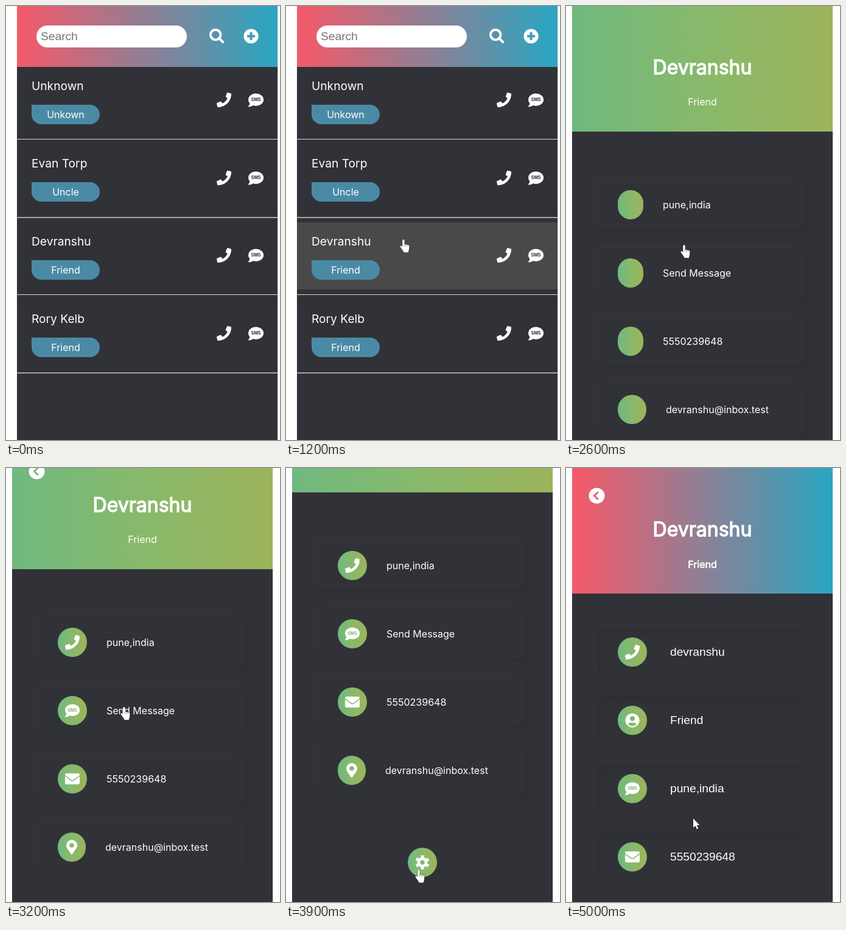
An HTML page for the animation above (5.1 s loop, 450 px wide and 712 px high).

```html
<!DOCTYPE html>
<html lang="en">
<head>
<meta charset="utf-8">
<title>Contacts</title>
<style>
  :root { --dark: #313237; --warm: linear-gradient(90deg, #f05b6b 3%, #2ea4bf 97%); --fresh: linear-gradient(90deg, #6fb97f, #88b96b 50%, #9db45c); }
  * { box-sizing: border-box; }
  html, body { margin: 0; width: 100%; height: 100%; overflow: hidden; background: #fff; }
  body { position: relative; color: #fff; font: 16px/24px Inter, sans-serif; }
  body * { animation-duration: 5100ms; animation-timing-function: step-end; animation-iteration-count: infinite; }
  svg { display: block; fill: currentColor; fill-rule: evenodd; overflow: visible; }

  .stage { position: absolute; inset: 0 auto auto 0; width: 450px; height: 712px; overflow: hidden; }
  .scene { position: absolute; top: 0; width: 428px; height: 712px; overflow: hidden; background: var(--dark); --cut: var(--dark); }
  .scene > *, .row > *, .page > * { position: absolute; }
  #list { left: 18px; animation-name: list; }
  #detail { left: 10px; animation-name: detail; }
  #edit { left: 10px; animation-name: edit; }
  .head { inset: 0 0 auto 0; background: var(--warm); }

  /* contact list */
  #list .head { height: 100px; }
  .search { left: 32px; top: 32px; width: 247px; height: 36px; padding-left: 7px; border-radius: 18px; background: #fff; color: #757575; font: 19.2px/35px "Liberation Sans", Arial, sans-serif; }
  .row { left: 0; width: 428px; height: 110px; }
  .glow { inset: 0; background: #494949; opacity: 0; }
  .row:nth-of-type(3) .glow { animation-name: glow1; }
  .row:nth-of-type(4) .glow { animation-name: glow2; }
  .row:nth-of-type(5) .glow { animation-name: glow3; }
  .who { left: 24px; top: 19px; font-size: 19.2px; white-space: nowrap; }
  .tag { left: 24px; top: 62px; width: 112px; height: 32px; border-radius: 0 16px 16px 16px; background: #4a8aa5; line-height: 32px; text-align: center; }
  .rule { left: 0; top: 118.5px; width: 428px; height: 1px; background: #dadada; }
  .row:nth-of-type(even) .rule { height: 2px; background: #a4a4a7; }

  /* contact pages */
  .page { position: absolute; inset: 0; }
  #detail .page { animation-name: scroll; }
  .page .head { height: 206px; }
  #detail .head { background: var(--fresh); }
  .title, .sub { left: 0; width: 100%; text-align: center; }
  .title { top: 81px; font-size: 32px; line-height: 40px; -webkit-text-stroke: 1.3px #fff; }
  .sub { top: 145px; }
  #edit .sub { top: 146px; -webkit-text-stroke: .7px #fff; }
  .back { left: 27px; top: 32px; animation-name: icons; }
  .card { left: 43px; width: 339px; height: 80px; padding-left: 32px; display: flex; align-items: center; gap: 32px; border-radius: 10px; white-space: nowrap; box-shadow: -7px -7px 8px #353437, 7px 7px 10px #2f3035; }
  #edit .card { gap: 38px; font: 19.2px/24px "Liberation Sans", Arial, sans-serif; box-shadow: inset 5px 5px 8px #2e2f34, inset -5px -5px 8px #353437; }
  .dot { flex: none; display: grid; place-items: center; width: 48px; height: 48px; border-radius: 24px; background: var(--fresh); --cut: #86b86d; animation-name: dots; }
  .dot svg { animation-name: icons; }
  .dot.pin { width: 46px; animation-name: pin; }
  .dot.gear { left: 190px; top: 789px; animation-name: none; }

  /* pointer */
  #pointer { position: absolute; left: 0; top: 0; animation-name: move; }
  #pointer svg { position: absolute; stroke: #222; stroke-width: .8; stroke-linejoin: round; paint-order: stroke; }
  #arrow { left: 0; top: 0; animation-name: arrow; }
  #hand { left: -6px; top: -1px; animation-name: hand; }

  @keyframes list { 0% { opacity: 1 } 50.98% { opacity: 0 } }
  @keyframes detail { 0% { opacity: 0 } 50.98% { opacity: 1 } 86.27% { opacity: 0 } }
  @keyframes edit { 0% { opacity: 0 } 86.27% { opacity: 1 } }
  @keyframes glow1 { 0% { opacity: 0 } 13.72% { opacity: .7 } 15.68% { opacity: .4 } 17.64% { opacity: 0 } }
  @keyframes glow2 { 0% { opacity: 0 } 15.68% { opacity: .7 } 17.64% { opacity: .85 } 19.6% { opacity: .3 } 21.56% { opacity: 0 } }
  @keyframes glow3 { 0% { opacity: 0 } 19.6% { opacity: .5 } 21.56% { opacity: .9 } 23.52% { opacity: 1 } }
  @keyframes icons { 0% { opacity: 0 } 52.94% { opacity: 1 } 86.27% { opacity: 0 } 88.23% { opacity: 1 } }
  @keyframes dots { 0% { width: 42px } 52.94% { width: 48px } 86.27% { width: 42px } 88.23% { width: 48px } }
  @keyframes pin { 0% { width: 47px } 52.94% { width: 46px } }
  @keyframes scroll {
    0% { transform: none } 62.74% { transform: translateY(-40px) } 64.7% { transform: translateY(-101px) }
    66.66% { transform: translateY(-145px) } 68.62% { transform: translateY(-166px) }
  }
  @keyframes arrow { 0% { opacity: 1 } 13.72% { opacity: 0 } 17.64% { opacity: 1 } 19.6% { opacity: 0 } 72.54% { opacity: 1 } 76.47% { opacity: 0 } 92.15% { opacity: 1 } }
  @keyframes hand { 0% { opacity: 0 } 13.72% { opacity: 1 } 17.64% { opacity: 0 } 19.6% { opacity: 1 } 72.54% { opacity: 0 } 76.47% { opacity: 1 } 92.15% { opacity: 0 } }
  @keyframes move {
    0% { transform: translate(212px, -40px) }
    9.8% { transform: translate(209px, 6px) }
    11.76% { transform: translate(207px, 62px) }
    13.72% { transform: translate(204px, 150px) }
    15.68% { transform: translate(199px, 262px) }
    17.64% { transform: translate(195px, 351px) }
    19.6% { transform: translate(194px, 370px) }
    21.56% { transform: translate(193px, 380px) }
    23.52% { transform: translate(193px, 384px) }
    29.41% { transform: translate(193px, 385px) }
    31.37% { transform: translate(193px, 387px) }
    33.33% { transform: translate(194px, 389px) }
    35.29% { transform: translate(194px, 391px) }
    37.25% { transform: translate(194px, 393px) }
    68.62% { transform: translate(196px, 406px) }
    70.58% { transform: translate(200px, 450px) }
    72.54% { transform: translate(207px, 545px) }
    74.5% { transform: translate(214px, 625px) }
    76.47% { transform: translate(218px, 660px) }
    92.15% { transform: translate(217px, 654px) }
    94.11% { transform: translate(214px, 630px) }
    96.07% { transform: translate(211px, 598px) }
    98.03% { transform: translate(209px, 575px) }
  }
</style>
</head>
<body>
<svg width="0" height="0" style="position:absolute">
  <symbol id="phone" viewBox="0 0 512 512"><path d="M493.4 24.6l-104-24c-11.3-2.6-22.9 3.3-27.5 13.9l-48 112c-4.2 9.8-1.4 21.3 6.9 28l60.6 49.6c-36 76.7-98.9 140.5-177.2 177.2l-49.6-60.6c-6.8-8.3-18.2-11.1-28-6.9l-112 48C3.9 366.5-2 378.1.6 389.4l24 104C27.1 504.2 36.7 512 48 512c256.1 0 464-207.5 464-464 0-11.2-7.7-20.9-18.6-23.4z"/></symbol>
  <symbol id="sms" viewBox="0 0 512 512">
    <ellipse cx="256" cy="240" rx="256" ry="208"/>
    <path d="M60 340Q45 410 3 454q-8 26 12 26 90-5 150-50z"/>
    <text x="256" y="292" text-anchor="middle" font-family="Inter, sans-serif" font-weight="700" font-size="148" fill="var(--cut)">SMS</text>
  </symbol>
  <symbol id="find" viewBox="0 0 512 512"><path fill="none" stroke="currentColor" stroke-width="80" d="M208 40a168 168 0 1 0 .1 0zM330 330 480 480"/></symbol>
  <symbol id="plus" viewBox="0 0 512 512"><path d="M256 8a248 248 0 1 0 .1 0zM296 216h92v80h-92v92h-80v-92h-92v-80h92v-92h80z"/></symbol>
  <symbol id="back" viewBox="0 0 512 512"><path d="M256 8a248 248 0 1 0 .1 0zM142 256 279 119 318 158 220 256 318 354 279 393z"/></symbol>
  <symbol id="mail" viewBox="0 0 512 512"><path d="M0 112a48 48 0 0 1 48-48h416a48 48 0 0 1 48 48v14L300 284q-44 30-88 0L0 126zM0 166 196 312q60 42 120 0L512 166V400a48 48 0 0 1-48 48H48a48 48 0 0 1-48-48z"/></symbol>
  <symbol id="pin" viewBox="-64 0 512 512"><path d="M172 502C27 291 0 270 0 192a192 192 0 0 1 384 0c0 78-27 99-172 310a24 24 0 0 1-40 0zM192 272a80 80 0 1 0 0-160 80 80 0 0 0 0 160z"/></symbol>
  <symbol id="user" viewBox="0 0 512 512"><path d="M256 8a248 248 0 1 0 .1 0zM256 104a88 88 0 1 1-.1 0zM256 458a191 191 0 0 1-146-68c19-35 56-56 96-56 16 8 84 8 100 0 40 0 77 21 96 56a191 191 0 0 1-146 68z"/></symbol>
  <symbol id="gear" viewBox="0 0 512 512">
    <g fill="none" stroke="currentColor">
      <circle cx="256" cy="256" r="130" stroke-width="100"/>
      <circle cx="256" cy="256" r="205" stroke-width="86" pathLength="12" stroke-dasharray="1 1" transform="rotate(15 256 256)"/>
    </g>
  </symbol>
</svg>

<div class="stage">
  <div class="scene" id="list"></div>
  <div class="scene" id="detail"></div>
  <div class="scene" id="edit"></div>
  <div id="pointer">
    <svg id="arrow" width="12" height="19"><path d="M0 0V15L3.4 11.9 5.8 17.4 8.2 16.4 5.8 11H10.5z"/></svg>
    <svg id="hand" width="16" height="22"><path d="M4.2 1.8a1.7 1.7 0 0 1 3.4 0v5.6l5.6 1.4c1.6.4 2.3 1.2 2.2 2.8l-.5 5c-.2 1.6-1 2.8-1 4.6H6.6c-.6-2-2.6-4-4-6.2L.6 12c-.6-1.4.8-2.4 2-1.4l1.6 1.6z"/><path fill="none" stroke-width=".5" d="M7.6 7.4v4M10.2 8v3.4M12.8 8.8v2.8"/></svg>
  </div>
</div>

<script>
  const $ = id => document.getElementById(id);
  const icon = (name, size = 24, style = '', cls = '') =>
    `<svg class="${cls}" width="${size}" height="${size}" style="${style}"><use href="#${name}"/></svg>`;
  const at = (x, y) => `left:${x}px;top:${y}px`;

  const row = ([name, tag], i) => `
    <div class="row" style="top:${99.5 + 127.5 * i}px">
      <span class="glow"></span>
      <span class="who">${name}</span>
      <span class="tag">${tag}</span>
      ${icon('phone', 24, at(328, 42.5))}
      ${icon('sms', 25, at(379.5, 42.5))}
      <span class="rule"></span>
    </div>`;

  const card = top => ([name, text], i) => `
    <div class="card" style="top:${top + 112 * i}px">
      <span class="dot ${name}">${icon(name)}</span><span>${text}</span>
    </div>`;

  const page = (top, cards, extra = '') => `
    <div class="page">
      <div class="head"></div>
      ${icon('back', 27, '', 'back')}
      <div class="title">Devranshu</div>
      <div class="sub">Friend</div>
      ${cards.map(card(top)).join('')}
      ${extra}
    </div>`;

  const people = [['Unknown', 'Unkown'], ['Evan Torp', 'Uncle'], ['Devranshu', 'Friend'], ['Rory Kelb', 'Friend']];
  const phone = '5550239648', city = 'pune,india';

  $('list').innerHTML = `
    <div class="head"></div>
    <div class="search">Search</div>
    ${icon('find', 25, at(316, 37))}
    ${icon('plus', 25, at(371.5, 37))}
    ${people.map(row).join('')}`;

  $('detail').innerHTML = page(285.5,
    [['phone', city], ['sms', 'Send Message'], ['mail', phone], ['pin', 'devranshu@inbox.test']],
    `<span class="dot gear">${icon('gear')}</span>`);

  $('edit').innerHTML = page(262,
    [['phone', 'devranshu'], ['user', 'Friend'], ['sms', city], ['mail', phone]]);
</script>
</body>
</html>
```
